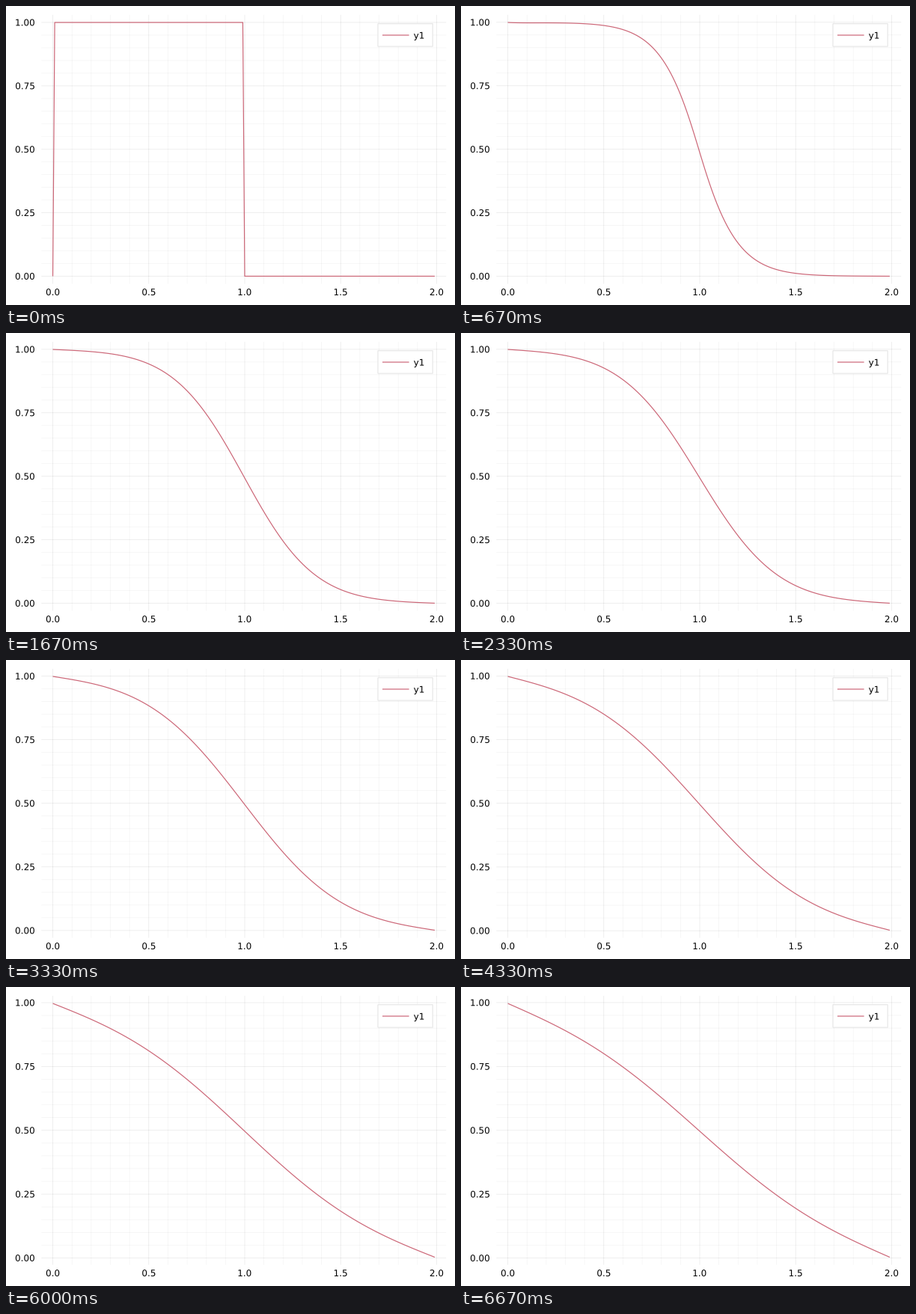
These frames come from a looping animation (600x400 px, 7010 ms). A matplotlib script:

```python
import numpy as np
import matplotlib.pyplot as plt
from matplotlib.animation import FuncAnimation
from matplotlib.collections import LineCollection
from matplotlib.patches import PathPatch, Rectangle
from matplotlib.textpath import TextPath
from matplotlib.transforms import Affine2D

plt.rcParams["font.family"] = "DejaVu Sans"
plt.rcParams["path.simplify"] = False

W, H, DPI = 600, 400, 100
LEFT, RIGHT, TOP, BOTTOM = 47.24, 588.19, 11.81, 371.65
STEPS, LOOP_MS = 21, 7010
N, DX, D_DT = 200, 0.01, 0.01
PX = 72 / DPI
CURVE = "#cc6677"
FONT = 12


def solve_steps():
    """Implicit Euler for heat flow, held at 1 on the left and 0 on the right."""
    r = D_DT / DX**2
    system = (1 + 2 * r) * np.eye(N) - r * (np.eye(N, k=1) + np.eye(N, k=-1))
    edge = np.zeros(N)
    edge[0] = r
    u = np.zeros(N)
    u[1:100] = 1
    states = [u]
    for _ in range(STEPS - 1):
        u = np.linalg.solve(system, u + edge)
        states.append(u)
    return states


def scale(values, lo, hi, start, end):
    """Map values to pixels, leaving a 3% margin around lo..hi."""
    pad = 0.03 * (hi - lo)
    return start + (np.asarray(values) - lo + pad) / (hi - lo + 2 * pad) * (end - start)


fig = plt.figure(figsize=(W / DPI, H / DPI), dpi=DPI, facecolor="white")
ax = fig.add_axes([0, 0, 1, 1])
ax.set_xlim(0, W)
ax.set_ylim(H, 0)
ax.axis("off")


def grid(alpha):
    lines = LineCollection([], colors=[(0, 0, 0, alpha)], linewidths=0.65 * PX, zorder=1)
    lines.set_snap(False)
    return ax.add_collection(lines, autolim=False)


class Label:
    """Text outline placed with sub-pixel accuracy."""

    def __init__(self, text, x, y, align, zorder=3):
        path = TextPath((0, 0), text, size=FONT)
        box = path.get_extents()
        anchor = {"left": box.x0, "center": (box.x0 + box.x1) / 2, "right": box.x1}
        self.dx = x - anchor[align]
        self.patch = PathPatch(path, fc="black", lw=0, zorder=zorder)
        ax.add_patch(self.patch)
        self.move(y)

    def move(self, y):
        place = Affine2D().scale(1, -1).translate(self.dx, y + 0.365 * FONT)
        self.patch.set_transform(place + ax.transData)


states = solve_steps()
x = np.arange(N) * DX
x_px = scale(x, x[0], x[-1], LEFT, RIGHT)


def x_lines(ticks):
    return [[(p, TOP), (p, BOTTOM)] for p in scale(ticks, x[0], x[-1], LEFT, RIGHT)]


def y_lines(ticks):
    return [[(LEFT, p), (RIGHT, p)] for p in ticks]


x_major = np.arange(5) * 0.5
x_minor = np.array([i * 0.1 for i in range(21) if i % 5])
y_major = np.arange(5) * 0.25
y_minor = np.array([i * 0.05 for i in range(21) if i % 5])

grid(0.10).set_segments(x_lines(x_major))
grid(0.05).set_segments(x_lines(x_minor))
h_major, h_minor = grid(0.10), grid(0.05)

for tick, px in zip(x_major, scale(x_major, x[0], x[-1], LEFT, RIGHT)):
    Label(f"{tick:.1f}", px, 382.6, "center")
y_labels = [Label(f"{tick:.2f}", 37.9, 0, "right") for tick in y_major]

curve, = ax.plot([], [], color=CURVE, lw=1.2 * PX, solid_joinstyle="round",
                 solid_capstyle="butt", snap=False, zorder=2)

ax.add_patch(Rectangle((497, 23.7), 73.2, 30.4, fc="white", ec="#e5e5e5",
                       lw=1.1 * PX, snap=False, zorder=4))
ax.plot([503, 538.6], [39, 39], color=CURVE, lw=1.2 * PX,
        solid_capstyle="butt", snap=False, zorder=5)
Label("y1", 545, 39.2, "left", zorder=5)


def update(i):
    u = states[i]
    lo, hi = u.min(), u.max()

    def to_px(values):
        return scale(values, lo, hi, BOTTOM, TOP)

    curve.set_data(x_px, to_px(u))
    major = to_px(y_major)
    h_major.set_segments(y_lines(major))
    h_minor.set_segments(y_lines(to_px(y_minor)))
    for label, y in zip(y_labels, major):
        label.move(y)
    return [curve, h_major, h_minor] + [label.patch for label in y_labels]


anim = FuncAnimation(fig, update, frames=STEPS, interval=LOOP_MS / STEPS,
                     repeat=True, repeat_delay=0, blit=False)
plt.show()
```
